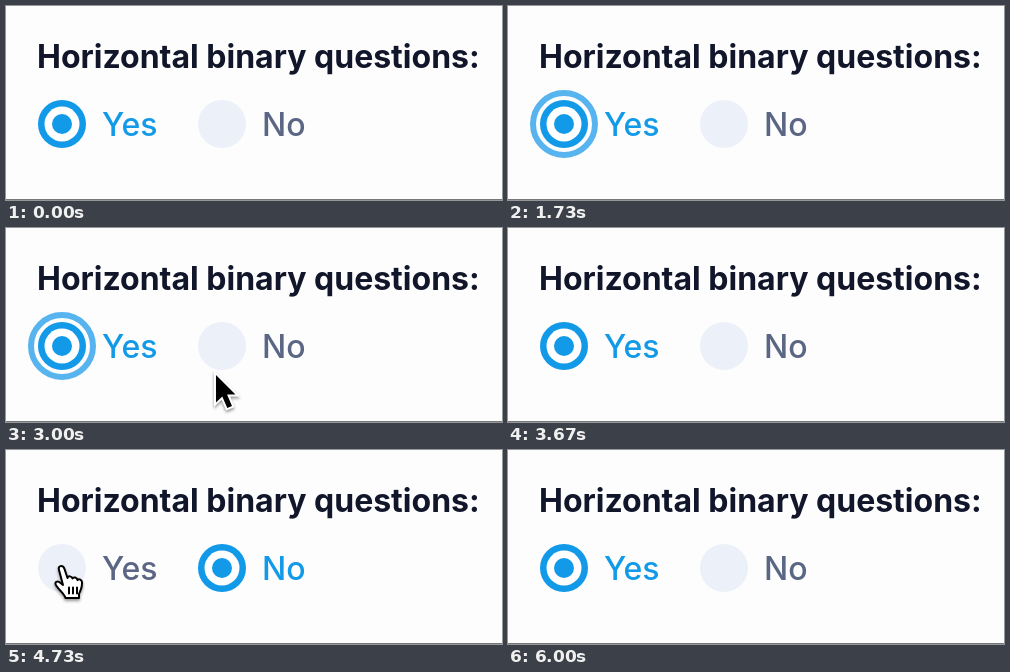
These frames come from a looping animation (496x194 px, 6540 ms). An HTML page:

```html
<!DOCTYPE html>
<html lang="en">
<head>
<meta charset="utf-8">
<title>Horizontal binary questions</title>
<style>
  html, body { margin: 0; width: 100%; height: 100%; overflow: hidden; background: #fdfdfd; }
  svg { display: block; width: 100%; height: 100%; }
  text { font: 500 32px Inter, sans-serif; fill: #5b6685; }
  .heading { font-weight: 700; fill: #11162a; }
  .off { fill: #ecf0f9; }
  .on, .focus { visibility: hidden; }
  .focus { fill: none; stroke: #58b4ee; stroke-width: 6; }
  .checked .on, .focused .focus { visibility: visible; }
  .blue, .checked text { fill: #129ae8; }
  .cursor { filter: drop-shadow(0 2px 1.5px #0006); }
  #arrow { fill: #000; stroke: #fff; stroke-width: 4; paint-order: stroke; }
  #hand { fill: #fff; stroke: #000; stroke-width: 2; stroke-linecap: round; stroke-linejoin: round; }
</style>
</head>
<body>
<svg viewBox="0 0 496 194">
  <text class="heading" x="31" y="62">Horizontal binary questions:</text>
  <g id="options"></g>
  <rect y="193" width="496" height="1" fill="#777"/>
  <g class="cursor" id="arrow">
    <path d="M2 2V29.500L8.300 23.500L13.300 35L18 33L13.100 21.700H21.500Z"/>
  </g>
  <g class="cursor" id="hand">
    <path d="M5 6C3.500 1.500 9 0.500 10.500 5L13.500 14C14 11.500 18 12 18.500 14.500C19.500 12.500 23 13.500 23.500 16C25 14.500 28 15.500 28 18.500C28.500 24 26 27 25 30V34H11.500C10.500 30 6 27 2.500 22C-0.500 18 3.500 16 6.500 19L9 21Z"/>
    <path d="M15 23.500v6M19 23.500v6M23 23.500v6"/>
  </g>
</svg>
<script>
const LOOP = 6540;

// [start, selected label, has keyboard focus]
const selections = [
  [0, 'Yes', false],
  [1000, 'No', true],
  [1670, 'Yes', true],
  [2270, 'No', true],
  [2930, 'Yes', true],
  [3530, 'Yes', false],
  [3730, 'No', false],
  [4870, 'Yes', false]
];

// [start, cursor shape, x, y]; positions glide to the next entry
const moves = [
  [0, null, 0, 0],
  [3000, 'arrow', 208, 145],
  [3070, 'hand', 207, 137],
  [3130, 'hand', 205, 135],
  [3530, 'hand', 205, 135],
  [3600, null, 205, 130],
  [3730, 'hand', 205, 122],
  [3930, 'hand', 205, 113],
  [4530, 'hand', 205, 113],
  [4730, 'hand', 48, 114],
  [5130, 'hand', 48, 114],
  [5270, 'arrow', 2, 138],
  [5470, 'arrow', 72, 142],
  [5600, null, 70, 194],
  [LOOP, null, 70, 194]
];

const options = document.getElementById('options');
options.innerHTML = [['Yes', 56], ['No', 216]].map(([label, x]) => `
  <g id="${label}" transform="translate(${x} 118)">
    <circle class="off" r="24"/>
    <g class="on">
      <circle class="blue" r="24"/>
      <circle fill="#fff" r="17.500"/>
      <circle class="blue" r="10"/>
    </g>
    <circle class="focus" r="31"/>
    <text x="40" y="12">${label}</text>
  </g>`).join('');

const cursors = ['arrow', 'hand'].map(id => document.getElementById(id));
const indexAt = (track, time) => track.findLastIndex(([start]) => start <= time);

function draw(time) {
  const [, selected, focused] = selections[indexAt(selections, time)];
  for (const option of options.children) {
    const checked = option.id === selected;
    option.classList.toggle('checked', checked);
    option.classList.toggle('focused', checked && focused);
  }

  const index = indexAt(moves, time);
  const [start, shape, x, y] = moves[index];
  const [end, , nextX, nextY] = moves[index + 1];
  const progress = (time - start) / (end - start);
  const left = x + (nextX - x) * progress;
  const top = y + (nextY - y) * progress;
  for (const cursor of cursors) {
    cursor.style.visibility = cursor.id === shape ? 'visible' : 'hidden';
    cursor.setAttribute('transform', `translate(${left} ${top})`);
  }
}

const origin = performance.now();
function frame() {
  draw((performance.now() - origin) % LOOP);
  requestAnimationFrame(frame);
}
frame();
</script>
</body>
</html>
```
